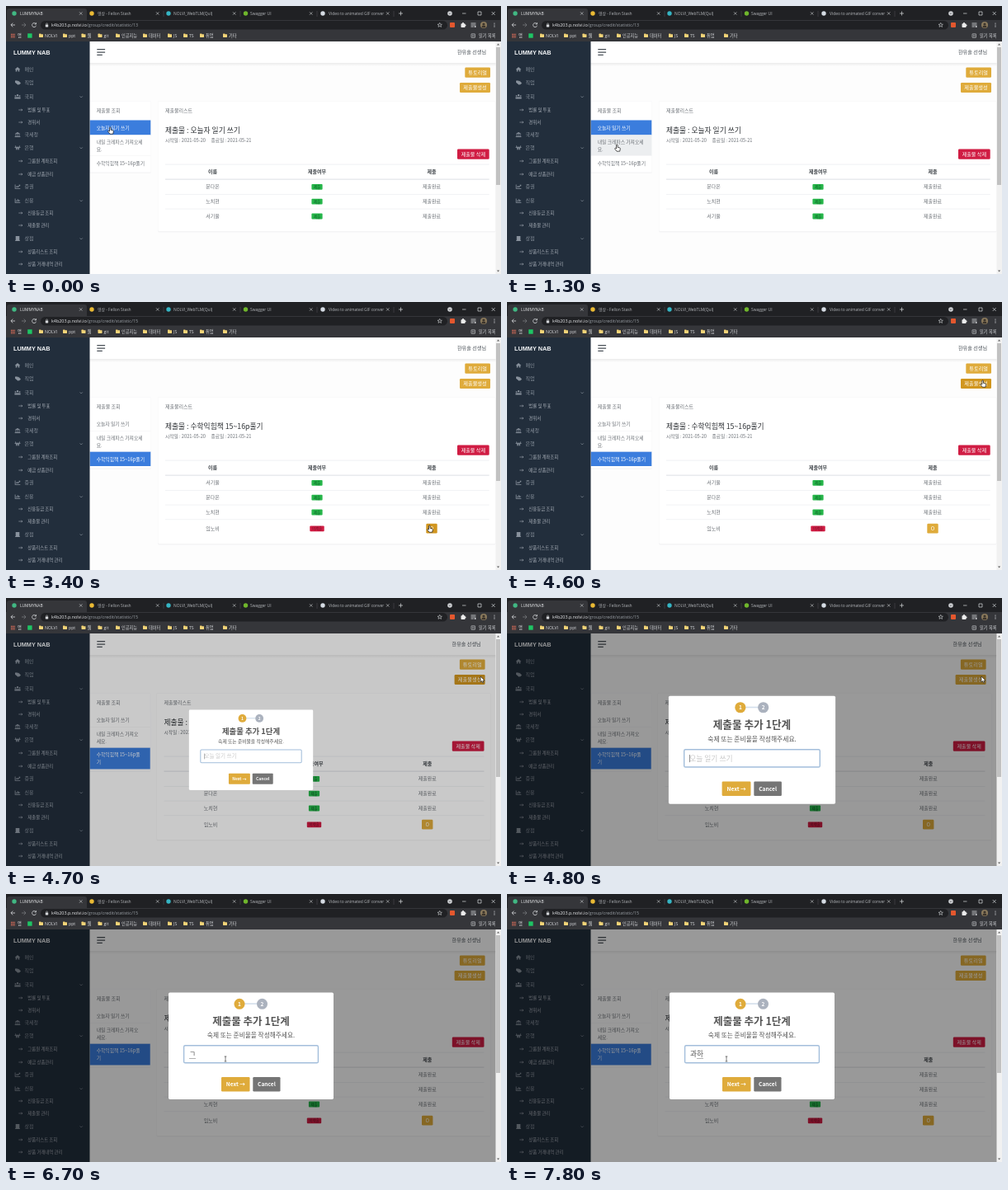
An HTML page that plays this animation: 600 by 325 pixels, repeating every 8000 ms.

```html
<!DOCTYPE html>
<html>
<head>
<meta charset="utf-8">
<style>
html, body { margin: 0; width: 100%; height: 100%; overflow: hidden; background: #fff; }
svg { display: block; font-family: "Noto Sans CJK KR", "Noto Sans", sans-serif; }
.ui { font-family: "Open Sans", "Noto Sans CJK KR", sans-serif; }
</style>
</head>
<body>
<svg id="stage" width="600" height="325" viewBox="0 0 600 325"></svg>
<script>
const LOOP = 8000, STEP = 100, OPEN_AT = 4680;
const GOLD = '#dfab3b', GOLD_HOVER = '#d1961f', RED = '#d01c43', GREEN = '#26b64a', BLUE = '#3b7ddd', GREY = '#6a6f75';

// y is the vertical middle of the text
const text = (x, y, s, size = 6, fill = GREY, anchor = 'start', weight = 400) =>
  `<text x="${x}" y="${y + size * .36}" font-size="${size}" fill="${fill}" text-anchor="${anchor}" font-weight="${weight}">${s}</text>`;
const rect = (x, y, w, h, fill, r = 0, extra = '') =>
  `<rect x="${x}" y="${y}" width="${w}" height="${h}" rx="${r}" fill="${fill}" ${extra}/>`;
const dot = (x, y, r, fill) => `<circle cx="${x}" cy="${y}" r="${r}" fill="${fill}"/>`;
const line = (d, stroke, w = .8) => `<path d="${d}" fill="none" stroke="${stroke}" stroke-width="${w}"/>`;
const at = (x, y, s) => `<g transform="translate(${x} ${y})">${s}</g>`;
const button = (x, y, w, h, label, fill, size = 6, weight = 400) =>
  rect(x, y, w, h, fill, 1.3) + text(x + w / 2, y + h / 2, label, size, '#fff', 'middle', weight);
const latest = (keys, t) => keys.filter(k => k[0] <= t).pop();

// Value of [time, ...numbers] keys at time t
function tween(keys, t) {
  const i = keys.findIndex(k => k[0] > t);
  if (i < 0) return keys[keys.length - 1].slice(1);
  const a = keys[i - 1], b = keys[i], p = (t - a[0]) / (b[0] - a[0]);
  return a.slice(1).map((v, n) => v + (b[n + 1] - v) * p);
}

const TABS = [
  [10, 17, 'LUMMYNAB', '#41b883'], [104, 111, '영상 - Fellon Stash', '#e9b934'],
  [197, 203, 'NOLVI_WebTLM(QuI)', '#35b5c4'], [290.5, 296, 'Swagger UI', '#6fb62c'],
  [384, 391, 'Video to animated GIF conver', '#d5dbe3']];
const BOOKMARKS = [[47, 'NOLVI'], [76, 'ppt'], [98.5, '웹'], [118.5, 'git'], [140, '인공지능'],
  [173, '데이터'], [203, 'JS'], [222, 'TS'], [242, '취업'], [270, '기타']];

function browser(page) {
  const ink = '#d6d8db';
  let s = rect(0, 0, 600, 18, '#202124') + rect(1, 3, 97, 18, '#35363a', 3) + rect(0, 17, 600, 26, '#35363a');
  TABS.forEach(([ix, x, label, color], i) => {
    const end = 98 + i * 93;
    s += dot(ix, 9, 2.7, color) + text(x, 9, label, 4.9, i ? '#b4b7bb' : '#e6e8ea');
    s += line(`M${end - 9} 7.3l3.4 3.4m0-3.4l-3.4 3.4`, ink, .6);
    if (i) s += line(`M${end} 6v7`, '#55575b', .5);
  });
  s += line('M476 9h5M478.5 6.5v5', ink, .7) + dot(538, 9, 2.8, '#d0d2d5') + line('M536.8 8.5l1.2 1.2 1.2-1.2', '#202124', .6);
  s += line('M553 9h4.5M572 7h4v4h-4zM588.7 7l4 4m0-4l-4 4', ink, .7);

  s += line('M11 23H6m2.3-2.4L5.9 23l2.4 2.4M36 21.5a2.5 2.5 0 1 0 .5 2.2M36.5 20.2v1.8h-1.8', ink);
  s += line('M19 23h5m-2.3-2.4L24 23l-2.3 2.4', '#77797d');
  s += rect(42, 18, 493, 10.5, '#202124', 5.2);
  s += rect(47.8, 22.6, 3.4, 2.8, ink, .3) + line('M48.5 22.7v-.8a1 1 0 0 1 2 0v.8', ink, .5);
  s += text(55, 23, `k4b203.p.nolvi.io<tspan fill="#9aa0a6">/group/credit/statistic/${page}</tspan>`, 5.4, '#e8eaed');
  s += line('M525.7 20.4l.8 1.8 1.9.1-1.5 1.2.6 1.9-1.8-1.1-1.7 1.1.5-1.9-1.5-1.2 1.9-.1z', ink, .6);
  s += rect(538, 20, 6, 6, '#e4572e', 1);
  s += rect(551.5, 21.3, 5, 4.8, '#eee', .8) + dot(554, 21, 1.1, '#eee') + dot(556.6, 23.6, 1, '#eee');
  s += line('M563.5 21h6m-6 2h6m-6 2h3.5', ink, .8) + dot(568.7, 25, 1, ink);
  s += dot(579, 23, 4, '#8b7a5c') + dot(579, 22, 1.6, '#3c352c') + rect(576.7, 23.7, 4.6, 2.5, '#3c352c', 1.2);
  for (let i = -1; i < 2; i++) s += dot(592, 23 + i * 1.9, .6, ink);

  for (let i = 0; i < 9; i++) s += rect(6 + i % 3 * 1.8, 33.7 + (i / 3 | 0) * 1.8, 1.2, 1.2, '#e0705c');
  s += text(14, 36, '앱', 5.2, ink) + rect(26.2, 33.3, 5.4, 5.4, '#1ec564');
  BOOKMARKS.forEach(([x, label]) => {
    s += rect(x - 7, 33.5, 2.5, 2, '#e9c867', .4) + rect(x - 7, 34.2, 5, 3.8, '#f2d478', .4);
    s += text(x, 36, label, 5.2, ink);
  });
  s += rect(564, 33.8, 4.5, 4.5, 'none', .3, `stroke="${ink}" stroke-width=".6"`) + line('M565 35.3h2.5m-2.5 1.5h2.5', ink, .5);
  s += text(573, 36, '읽기 목록', 5.2, ink);
  return `<g class="ui">${s}</g>`;
}

const ICONS = {
  home: 'M-3.3 0L0-3 3.3 0H2.3V2.6H.7V.6H-.7V2.6H-2.3V0z',
  tag: 'M-3-2.5H0L3 .5.6 2.8-3-.3zM1-2.5L4 .5 1.8 2.7',
  people: 'M-1-2.8h2v2h-2zM-3.3-1.8h1.6v1.6h-1.6zM1.7-1.8h1.6v1.6H1.7zM-3.6.4h7.2v2.2h-7.2z',
  bank: 'M-3.3-1L0-3 3.3-1zM-2.6-.6h1v2.2h-1zM-.5-.6h1v2.2h-1zM1.6-.6h1v2.2h-1zM-3.3 2h6.6v.9h-6.6z',
  won: 'M-3-2.5h1l1 3.6L-.4-1.5h.8L1 1.1l1-3.6h1L1.5 2.6H.7L0-.2-.7 2.6h-.8zM-3.5-.7h7v.7h-7z',
  trend: 'M-3.3-2.6h.8v4.5h5.8v.8h-6.6zM-2 .6L-.5-1 .5 0 2-1.7 1.3-2.3H3.2V-.4L2.6-1 .5 1.2-.5.2-1.4 1.2z',
  bars: 'M-3.3-2.6h.8v4.5h5.8v.8h-6.6zM-1.8-.2h1v1.5h-1zM-.2-1.8h1v3.1h-1zM1.4-1h1v2.3h-1z',
  shop: 'M-2.3-3h4.6v5.9h-4.6zM-3 2.3h6v.7h-6z'
};
// [y, label, icon, has submenu]; entries without an icon are submenu links
const MENU = [
  [77, '메인', 'home'], [93, '직업', 'tag'], [110, '국회', 'people', 1], [126, '법률 및 투표'], [141, '경위서'],
  [156, '국세청', 'bank'], [172, '은행', 'won', 1], [188, '그룹원 계좌조회'], [204, '예금 상품관리'],
  [219, '증권', 'trend'], [236, '신용', 'bars', 1], [251, '신용등급 조회'], [266, '제출물 관리'],
  [282, '상점', 'shop', 1], [298, '상품리스트 조회'], [313, '상품 거래내역 관리']];

function sidebar() {
  const dim = '#89929d', lit = '#a6adb6';
  let s = rect(0, 43, 101.5, 282, '#222e3c');
  s += `<g font-family="Liberation Sans, sans-serif">${text(9, 56.5, 'LUMMY NAB', 7.3, '#f4f6f8', 'start', 700)}</g>`;
  MENU.forEach(([y, label, icon, sub]) => {
    s += icon ? at(14, y, `<path d="${ICONS[icon]}" fill="${dim}"/>`) + text(22.5, y, label, 6, dim)
      : line(`M15.3 ${y}h4.5m-1.3-1.3l1.3 1.3-1.3 1.3`, lit, .6) + text(26.3, y, label, 5.4, lit);
    if (sub) s += line(`M89.6 ${y - .6}l1.6 1.6 1.6-1.6`, dim, .7);
  });
  return s;
}

const [WRITER, SECOND, THIRD, LAST] = ['문다온', '노치현', '서기율', '임노비'];
const TASKS = [
  ['오늘자 일기 쓰기', [WRITER, SECOND, THIRD]],
  ['내일 크레파스 가져오세요.', [THIRD, WRITER, SECOND]],
  ['수학익힘책 15~16p풀기', [THIRD, WRITER, SECOND, LAST]]];

function taskList(active, hover, open) {
  const x = 101.7, w = open ? 73 : 73.6;
  const items = [[138.5, 18, ['오늘자 일기 쓰기']],
    [156.5, 25, open ? ['내일 크레파스 가져오', '세요.'] : ['내일 크레파스 가져오세', '요.']],
    [181.5, open ? 26 : 17.5, open ? ['수학익힘책 15~16p풀', '기'] : ['수학익힘책 15~16p풀기']]];
  let s = rect(x - .5, 115, w + 1, open ? 96 : 88, '#f6f6f7', 1.5) + rect(x, 115.5, w, open ? 94 : 86, '#fff', 1);
  s += text(109.7, 126.5, '제출물 조회');
  items.forEach(([y, h, rows], i) => {
    const on = i === active;
    s += rect(x, y, w, h, on ? BLUE : i === hover ? '#eceef0' : '#fff');
    if (i) s += rect(x, y, w, .4, '#eceef0');
    rows.forEach((row, n) => s += text(109.7, y + (rows[1] ? 8 : 9) + n * 9, row, 5.8, on ? '#fff' : GREY, 'start', on ? 500 : 400));
  });
  return s;
}

function taskDetail(active, open, hoverMark) {
  const [title, names] = TASKS[active];
  const left = open ? 191.5 : 193, right = open ? 579.5 : 585.7, card = left - 8.5;
  const cols = open ? [248, 373.5, 510.7] : [250.5, 377, 516];
  const bottom = names.length > 3 ? 293.5 : 273.5;
  let s = rect(card - .5, 115, right - card + 8.5, bottom - 114, '#f4f4f5', 1.5) + rect(card, 115.5, right - card + 7.5, bottom - 116, '#fff', 1);
  s += text(left, 126.5, '제출물리스트') + text(left, 150.5, '제출물 : ' + title, 8.75, '#2b2f33', 'start', 500);
  s += text(left, 162.5, '시작일 : 2021-05-20', 5.7, GREY, 'start', 500) + text(left + 55.5, 162.5, '종료일 : 2021-05-21', 5.7, GREY, 'start', 500);
  s += button(right - 38.7, 173.5, 38.7, 12.3, '제출물 삭제', RED, 6.1, 500);
  s += rect(left, 191.8, right - left, .5, '#dfe2e6') + rect(left, 209.7, right - left, .8, '#d4d8dd');
  ['이름', '제출여부', '제출'].forEach((h, i) => s += text(cols[i], 201, h, 6, '#43484d', 'middle', 700));
  names.forEach((name, i) => {
    const late = i > 2, y = late ? 274.5 : 219 + i * 17.8, half = late ? 8.7 : 6.6;
    s += text(cols[0], y, name, 6, GREY, 'middle');
    s += rect(cols[1] - half, y - 3, half * 2, 6.8, late ? RED : GREEN, 1);
    s += text(cols[1], y + .4, late ? '미제출' : '제출', 4.4, late ? '#74102a' : '#0d5a24', 'middle');
    s += late ? button(cols[2] - 6.7, 268.7, 13.4, 11.8, 'O', hoverMark ? GOLD_HOVER : GOLD, 6, 500)
      : text(cols[2], y, '제출완료', 6, GREY, 'middle');
    if (i < names.length - 1) s += rect(left, y + 9, right - left, .5, '#e3e6ea');
  });
  return s;
}

function page(t, active, open) {
  const dx = open ? -6.4 : 0;
  const hover = t >= 1300 && t < 1500 ? 1 : t >= 1800 && t < 2200 ? 2 : -1;
  const onCreate = t >= 3900 && t < 4800;
  let s = rect(101, 43, 499, 282, '#fdfdfd') + rect(101, 69, 493, 4, 'url(#shade)') + rect(101, 43, 493, 26, '#fff');
  s += line('M110.3 52.7h9.8M110.3 56h9.8M110.3 59.3h6.5', '#495057', 1.25);
  s += text(547 + dx, 56, '한유솔 선생님', 6.1, '#495057');
  s += button(556.3 + dx, 74.5, 30.7, 12.3, '튜토리얼', GOLD, 6.2);
  s += button(550 + dx, 93, 37, 12, '제출물생성', onCreate ? GOLD_HOVER : GOLD, 6.2);
  s += taskList(active, hover, open) + taskDetail(active, open, t >= 3400 && t < 3700);
  return s + sidebar();
}

const scrollbar = () => rect(593.5, 43, 6.5, 282, '#f1f1f1') + rect(594, 50, 5, 167, '#c1c1c1') +
  '<path d="M595 47.5l1.6-2 1.6 2zM595 320.5l1.6 2 1.6-2z" fill="#606060"/>';

const TYPING = [[0, ''], [6700, 'ㄱ'], [6800, '고'], [6900, '과'], [7300, '과ㅎ'], [7600, '과하']];
const POP = [[0, .7], [135, 1.05], [240, .95], [300, 1]];

function dialog(t) {
  const [scale] = tween(POP, t - OPEN_AT), typed = latest(TYPING, t)[1];
  let s = rect(197, 119.5, 200, 129.5, '#fff', 1.8);
  s += rect(288, 132.3, 18, 1.6, '#d3dfec') + dot(283, 133.3, 6.5, GOLD) + dot(310.5, 133.3, 6.5, '#abb2be');
  s += text(283, 133.3, '1', 6.5, '#fff', 'middle', 700) + text(310.5, 133.3, '2', 6.5, '#fff', 'middle', 700);
  s += text(297, 154, '제출물 추가 1단계', 12.5, '#545454', 'middle', 700);
  s += text(297, 171, '숙제 또는 준비물을 작성해주세요.', 7.7, '#545454', 'middle');
  s += rect(215.6, 183.8, 162.8, 21, '#fff', 1.6, 'stroke="#a3bedb" stroke-width="1.4"');
  s += text(222, 194.3, typed || '오늘 일기 쓰기', 8.7, typed ? '#545454' : '#c9c9c9');
  if (typed) s += rect(222 + (typed.length - 1) * 8, 199.3, 8, .5, '#666');
  else if (t < 5300 || t >= 6300) s += rect(222, 190, .6, 9, '#444');
  s += button(261, 222, 34.5, 17.5, 'Next →', GOLD, 6.6, 600) + button(299.3, 222, 33.2, 17.5, 'Cancel', '#757575', 6.6, 600);
  return `<g transform="translate(297 184.3) scale(${scale}) translate(-297 -184.3)">${s}</g>`;
}

const PATH = [[0, 127, 151], [1200, 127, 151], [1300, 134, 172], [1600, 134, 172], [1900, 132, 194], [2500, 132, 194],
  [2900, 376, 276], [3000, 376, 276], [3400, 514, 275], [3600, 514, 275], [3900, 578.5, 99], [4800, 577, 99],
  [5400, 293, 171], [5800, 266, 200]];
const SHAPES = {
  hand: '<path d="M-1.5 1V-3.3a.8.8 0 0 1 1.6 0V-.7L2.6-.1Q3.4.2 3.3 1.2L2.7 4.2H-1L-3.3 1.3Q-3.4.2-2.4.4z" fill="#fff" stroke="#111" stroke-width=".7"/>',
  arrow: '<path d="M-2-4V3L-.4 1.6.7 4 1.8 3.5.8 1.2H3z" fill="#fff" stroke="#111" stroke-width=".6"/>',
  beam: line('M-1.3-3h2.6M0-3v6M-1.3 3h2.6', '#222', .6)
};
const POINTER = [[0, 'hand'], [2600, 'arrow'], [3400, 'hand'], [3700, 'arrow'], [3900, 'hand'], [4700, 'arrow'], [5300, 'beam']];

const stage = document.getElementById('stage');
const SHADE = '<defs><linearGradient id="shade" x2="0" y2="1"><stop stop-color="#000" stop-opacity=".07"/><stop offset="1" stop-opacity="0"/></linearGradient></defs>';

function draw(t) {
  const active = t < 1500 ? 0 : t < 2200 ? 1 : 2, open = t > OPEN_AT;
  const [x, y] = tween(PATH, t);
  stage.innerHTML = SHADE + page(t, active, open) +
    (open ? rect(0, 43, 594, 282, '#000', 0, `opacity="${t < 4800 ? .21 : .4}"`) + dialog(t) : '') +
    scrollbar() + browser(13 + active) + at(x, y, SHAPES[latest(POINTER, t)[1]]);
}

let shown = -1;
function tick() {
  const t = Math.floor(performance.now() % LOOP / STEP) * STEP;
  if (t !== shown) draw(shown = t);
  requestAnimationFrame(tick);
}
tick();
</script>
</body>
</html>
```
